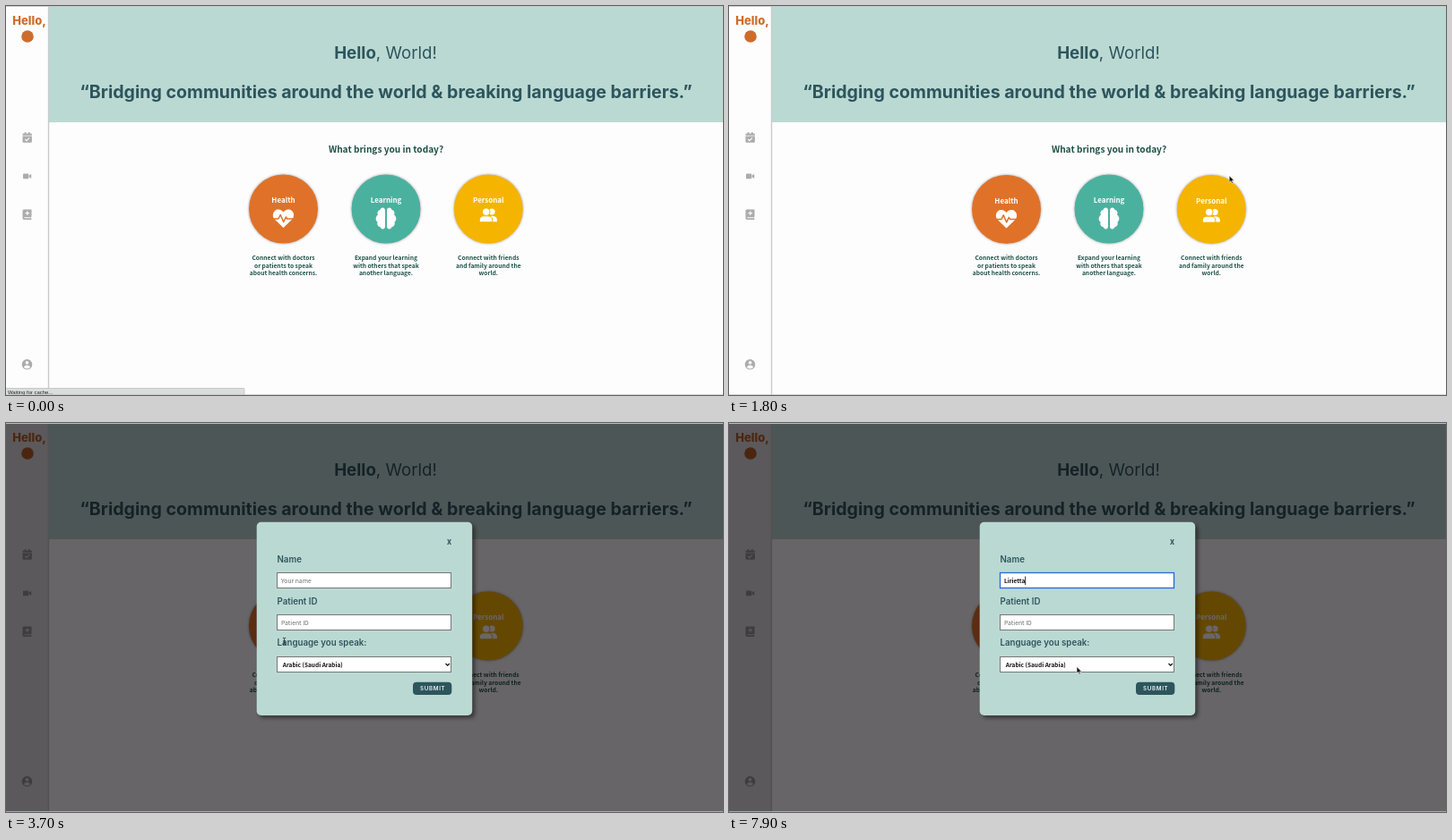
Animation, 800 px wide and 435 px high, one loop 8000 ms. Source, as an HTML page:

```html
<!DOCTYPE html>
<html lang="en">
<head>
<meta charset="utf-8">
<title>Welcome page</title>
<style>
  html, body { margin: 0; width: 100%; height: 100%; overflow: hidden; background: #fefdfe; }
  svg { display: block; width: 800px; height: 435px; }
  text { font-family: "Noto Sans CJK JP", "Noto Sans CJK SC", "Noto Sans CJK", "Open Sans", sans-serif; white-space: pre; }
  .geo { font-family: Inter, sans-serif; fill: #2d555c; }
  .mid { text-anchor: middle; }
  .dark { fill: #1f5249; font-weight: 700; }
  .note { font-size: 6.7px; }
  .label { font-size: 9.7px; font-weight: 600; }
  .field { font-size: 6.8px; }
  .value { font-size: 6.5px; font-weight: 700; fill: #111; }
  .hint { fill: #6c6c6c; }
  .box { fill: #fff; stroke: #767676; }
  .disc { fill: var(--bg); stroke: var(--edge); stroke-width: 1.3; }
  .topic { filter: drop-shadow(0 .8px 1.6px rgba(0,0,0,.4)); }
  .topic text { font-size: 8px; font-weight: 700; fill: var(--fg); }
  .ink { fill: var(--fg); }
  .cut { fill: none; stroke: var(--bg); }
</style>
</head>
<body>
<svg viewBox="0 0 800 435">
  <rect width="800" height="435" fill="#fefdfe"/>
  <rect x="48" width="752" height="130" fill="#bbd9d3"/>
  <rect x="46.8" width="1.4" height="435" fill="#c9cbcb"/>

  <text class="geo" x="7.3" y="21" font-size="13" font-weight="800" style="fill:#cd6d2b">Hello,</text>
  <circle cx="24" cy="34" r="6.8" fill="#cd6d2b"/>

  <g fill="#acacac">
    <path d="M18.5 143.5q0-1 1-1h1.3v-1.4h1.5v1.4h2.8v-1.4h1.5v1.4h1.3q1 0 1 1v1.2H18.5zM18.5 145.4h10.4v6.4q0 1-1 1h-8.4q-1 0-1-1z"/>
    <path d="M21.3 149l1.6 1.6 3.2-3.2" fill="none" stroke="#fefdfe" stroke-width="1.1"/>
    <path d="M19.8 187.4h4.7q.8 0 .8.8v4.2q0 .8-.8.8h-4.7q-.8 0-.8-.8v-4.2q0-.8.8-.8zM25.7 189.4l2.5-1.7v5.2l-2.5-1.7z"/>
    <path d="M20 227.5h8.5v8.3h-.7v2h.7v1.2H20q-1.5 0-1.5-1.7V229q0-1.5 1.5-1.5z"/>
    <path d="M20.3 236.8h7M23.8 229.3v4.6M21.5 231.6h4.6" fill="none" stroke="#fefdfe" stroke-width="1.1"/>
    <circle cx="23.5" cy="400.8" r="5.8"/>
    <circle cx="23.5" cy="398.8" r="1.9" fill="#fefdfe"/>
    <path d="M19.9 404q.6-2.3 3.6-2.3t3.6 2.3q-1.5 1.5-3.6 1.5t-3.6-1.5z" fill="#fefdfe"/>
  </g>

  <text class="geo mid" x="423.5" y="58.8" font-size="18.7"><tspan font-weight="700">Hello</tspan>, World!</text>
  <text class="geo mid" x="424" y="103.2" font-size="19.6" font-weight="700">“Bridging communities around the world &amp; breaking language barriers.”</text>
  <text class="mid dark" x="424" y="163.7" font-size="10.1">What brings you in today?</text>

  <g id="health" class="topic" style="--edge:#df7228">
    <circle class="disc" r="37.8"/>
    <text class="mid" y="-6.8">Health</text>
    <g transform="translate(0 10.5)">
      <path class="ink" d="M0 10.5L-10 .8C-13.5-3-11-10-6-10-3-10-1-8.5 0-7 1-8.5 3-10 6-10 11-10 13.5-3 10 .8z"/>
      <path class="cut" stroke-width="1.5" stroke-linejoin="round" d="M-12 .5h6.5l2.2-4.5 3.5 8 2.6-5.5 1.2 2h8"/>
    </g>
  </g>
  <g id="learning" class="topic" style="--bg:#4bb19f;--edge:#4bb19f;--fg:#fff">
    <circle class="disc" r="37.8"/>
    <text class="mid" y="-6.8">Learning</text>
    <g transform="translate(0 10.5)">
      <path id="lobe" class="ink" d="M-1-9C-1-13-6-13-6.5-9.5-9.5-9-10-6-9-4-12-2-12 2.5-9.5 4-10.5 8-8 9.5-6.5 9.5-5.5 13-1 12.5-1 9z"/>
      <use href="#lobe" transform="scale(-1 1)"/>
    </g>
  </g>
  <g id="personal" class="topic" style="--bg:#f5b400;--edge:#f5b400;--fg:#fff">
    <circle class="disc" r="37.8"/>
    <text class="mid" y="-6.8">Personal</text>
    <g class="ink" transform="translate(0 7)">
      <circle cx="3.8" cy="-4" r="3.5"/>
      <path d="M0 7.2V4q0-3.2 4-3.2 5.6 0 5.6 4.5v1.9z"/>
      <g stroke="#f5b400">
        <circle cx="-2.6" cy="-3.8" r="4.3"/>
        <path d="M-10 7.7V5.6Q-10 .8-5 .8h4.5Q4.5.8 4.5 5.6v2.1z"/>
      </g>
    </g>
  </g>
  <g id="notes"></g>

  <g id="status">
    <rect x="-1" y="427.5" width="267" height="9" rx="1" fill="#dbdddd" stroke="#bfc1c1" stroke-width=".8"/>
    <text x="2" y="434" style="font:5.9px 'Liberation Sans',sans-serif" fill="#222">Waiting for cache...</text>
  </g>

  <g id="modal">
    <rect width="800" height="435" fill="#040104" opacity=".6"/>
    <rect width="47" height="435" opacity=".12"/>
    <rect x="279.7" y="110.7" width="240.5" height="216.2" rx="5" fill="#bbd9d3" style="filter:drop-shadow(3px 3px 2px rgba(0,0,0,.45))"/>
    <text class="mid" x="494.5" y="136.2" font-size="9" font-weight="700" fill="#2d555c">x</text>
    <text class="geo label" x="302.5" y="155.7">Name</text>
    <text class="geo label" x="302.5" y="202.5">Patient ID</text>
    <text class="geo label" x="302.5" y="249.2">Language you speak:</text>
    <rect id="nameBox" class="box" x="302.5" y="167.5" width="194" height="17"/>
    <rect class="box" x="302.5" y="214.5" width="194" height="17"/>
    <rect class="box" x="302.5" y="261.5" width="194" height="17"/>
    <text id="name" x="307" y="178.9"></text>
    <rect id="caret" y="171.5" width=".9" height="9.6" fill="#111"/>
    <text class="field hint" x="307" y="225.7">Patient ID</text>
    <text class="value" x="308.8" y="272.7">Arabic (Saudi Arabia)</text>
    <path d="M490.5 269l2.2 2.2 2.2-2.2" fill="none" stroke="#111" stroke-width="1.3"/>
    <rect x="454" y="289.8" width="43.3" height="14.2" rx="4" fill="#2d555c"/>
    <text class="geo" x="462" y="299.2" font-size="6.2" font-weight="600" letter-spacing=".7" style="fill:#eaf5f2">SUBMIT</text>
  </g>

  <rect width="800" height=".9" fill="#c6c8c8"/>
  <rect y="434.3" width="800" height=".7" fill="#c6c8c8"/>

  <g id="cursor">
    <path id="arrow" d="M-1.5-3.5v7.6l1.8-1.6 1.2 2.7 1.3-.6-1.2-2.6h2.4z" fill="#111" stroke="#fff" stroke-width=".6"/>
    <path id="beam" d="M-1.6-3.8Q0-3.8 0-2.8 0-3.8 1.6-3.8M0-2.8v5.6M-1.6 3.8Q0 3.8 0 2.8 0 3.8 1.6 3.8M-1 1.3h2" fill="none" stroke="#222" stroke-width=".8"/>
    <path id="hand" d="M-1.8-3.7q.9-.8 1.6.2v2.3l3 .6q1 .3.9 1.4l-.6 3.2h-4.3l-2.5-3q-.3-1 .8-.8l1.1.6z" fill="#fff" stroke="#222" stroke-width=".8" stroke-linejoin="round"/>
  </g>
</svg>
<script>
const LOOP = 8000;
const OPEN = 2550, FOCUS = 4600;
const TYPE_START = 5500, KEY_GAP = 160, TYPED = "Lirietta";
const ORANGE = "#df7228";
const REST_Y = 227, BOB = 2.05;
const $ = id => document.getElementById(id);
const show = (id, on) => $(id).setAttribute("display", on ? "inline" : "none");
const place = (id, x, y) => $(id).setAttribute("transform", `translate(${x} ${y})`);

const captions = [
  [309.5, "Connect with doctors", "or patients to speak", "about health concerns."],
  [424, "Expand your learning", "with others that speak", "another language."],
  [538.3, "Connect with friends", "and family around the", "world."]
];
$("notes").innerHTML = captions.map(([x, ...lines]) => lines.map((line, i) =>
  `<text class="mid dark note" x="${x}" y="${283.8 + i * 8.75}">${line}</text>`).join("")).join("");

// Pointer stops: time, x, y
const stops = [
  [1500, 758, 150], [2150, 312, 247], [2500, 312, 247], [2600, 310.5, 244],
  [3700, 310.5, 244], [4450, 366, 183], [7200, 366, 183], [7800, 389.5, 276], [LOOP, 389.5, 276]
];

function pointerAt(t) {
  const i = Math.max(1, stops.findIndex(s => s[0] > t));
  const [t0, x0, y0] = stops[i - 1], [t1, x1, y1] = stops[i];
  const p = Math.min(1, Math.max(0, (t - t0) / (t1 - t0)));
  const e = p * p * (3 - 2 * p);
  return [x0 + (x1 - x0) * e, y0 + (y1 - y0) * e];
}

const bob = (t, span) => t < span ? BOB * (1 - Math.cos(2 * Math.PI * t / span)) : 0;

function drawTopics(t) {
  const hover = t >= 2050 && t < OPEN;
  place("health", 309.5, REST_Y + bob(t, 2000));
  place("learning", 424, REST_Y + bob(t, 1320));
  place("personal", 538.3, REST_Y + bob(t, 2000));
  $("health").style.setProperty("--bg", hover ? "#fefdfe" : ORANGE);
  $("health").style.setProperty("--fg", hover ? ORANGE : "#fff");
  return hover;
}

function drawForm(t) {
  const focused = t >= FOCUS;
  const count = t < TYPE_START ? 0 : Math.min(TYPED.length, 1 + Math.floor((t - TYPE_START) / KEY_GAP));
  const name = $("name");
  name.textContent = count ? TYPED.slice(0, count) : "Your name";
  name.setAttribute("class", count ? "value" : "field hint");
  $("nameBox").style.stroke = focused ? "#2a66d6" : "#767676";
  $("nameBox").style.strokeWidth = focused ? 1.3 : 1;
  const typing = t >= TYPE_START && t < 6900;
  show("caret", focused && (typing || Math.floor((t - FOCUS) / 500) % 2 === 0));
  $("caret").setAttribute("x", count ? 307 + name.getComputedTextLength() : 306.6);
}

function drawPointer(t, hover) {
  const [x, y] = pointerAt(t);
  const visible = t >= 1500 && (t < TYPE_START - 50 || t >= 7200);
  const beam = t >= OPEN && t < 7500;
  place("cursor", x, y);
  show("cursor", visible);
  show("hand", hover);
  show("beam", beam);
  show("arrow", !hover && !beam);
}

function draw(t) {
  show("status", t < 550);
  show("modal", t >= OPEN);
  const hover = drawTopics(t);
  drawForm(t);
  drawPointer(t, hover);
}

const start = performance.now();
function tick() {
  draw((performance.now() - start) % LOOP);
  requestAnimationFrame(tick);
}
tick();
</script>
</body>
</html>
```
